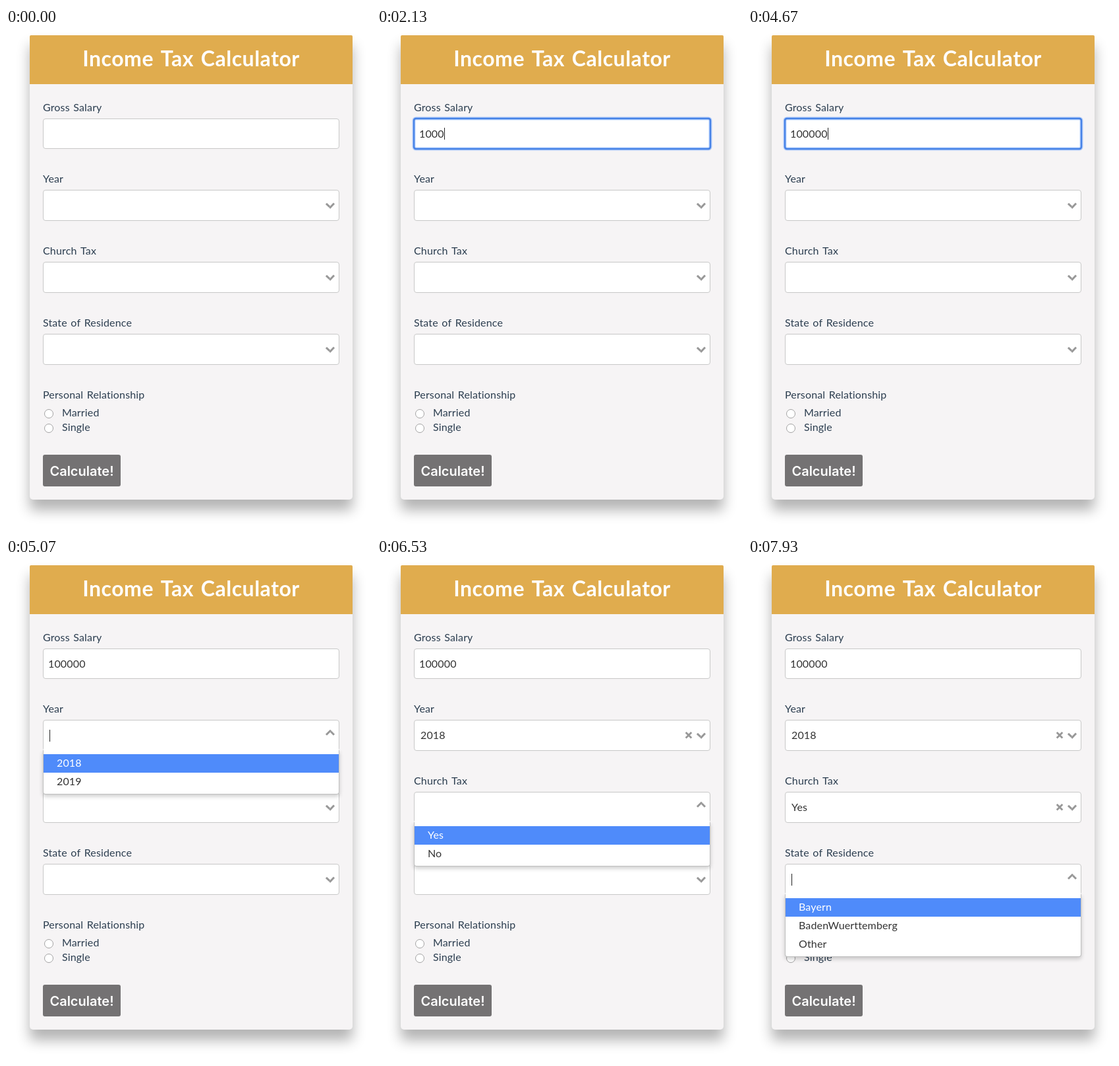
An HTML page with a canvas that plays this animation: 554x760 px, repeating every 8000 ms.

```html
<!DOCTYPE html>
<html lang="en">
<head>
<meta charset="utf-8">
<title>Income Tax Calculator</title>
<style>
  html, body { margin: 0; width: 100%; height: 100%; overflow: hidden; background: #fff; }
  canvas { display: block; width: 554px; height: 760px; }
</style>
</head>
<body>
<canvas id="stage"></canvas>
<script>
const W = 554, H = 760, LOOP = 8000, FADE = 150;
const LEFT = 56, WIDTH = 450;
const LABEL = '#2c3e50', VALUE = '#333', BORDER = '#c8c8c8', ICON = '#989898';

const canvas = document.getElementById('stage');
const ctx = canvas.getContext('2d');
const dpr = window.devicePixelRatio || 1;
canvas.width = W * dpr;
canvas.height = H * dpr;

// Salary input: focus, key presses and blur
const FOCUS = 670, BLUR = 4870;
const KEYS = [1270, 1600, 1800, 2030, 2530, 3670];
const SALARY = '100000';

const selects = [
  { label: 'Year', top: 245, options: ['2018', '2019'], open: 4870, pick: 5400, caretOff: 5370 },
  { label: 'Church Tax', top: 354, options: ['Yes', 'No'], open: 5800, pick: 7100, caretOff: 6530 },
  { label: 'State of Residence', top: 463, options: ['Bayern', 'BadenWuerttemberg', 'Other'],
    open: 7600, pick: Infinity, caretOff: Infinity }
];

const clamp = v => Math.min(1, Math.max(0, v));

function text(str, x, y, color, font = '16px Lato, sans-serif', spacing = 0.15, words = 1.3, align = 'left') {
  ctx.font = font;
  ctx.letterSpacing = spacing + 'px';
  ctx.wordSpacing = words + 'px';
  ctx.textAlign = align;
  ctx.fillStyle = color;
  ctx.fillText(str, x, y);
}

function box(x, y, w, h, radius, fill) {
  ctx.beginPath();
  ctx.roundRect(x, y, w, h, radius);
  ctx.fillStyle = fill;
  ctx.fill();
}

function outline(color, width) {
  ctx.strokeStyle = color;
  ctx.lineWidth = width;
  ctx.stroke();
}

function shadow(color, blur, dy) {
  ctx.shadowColor = color;
  ctx.shadowBlur = blur * dpr;
  ctx.shadowOffsetY = dy * dpr;
}

function field(top, height) {
  box(LEFT + 0.5, top + 0.5, WIDTH - 1, height - 1, 3.5, '#fff');
  outline(BORDER, 1);
}

function caret(x, top) {
  ctx.fillStyle = '#222';
  ctx.fillRect(Math.round(x), top, 1, 18);
}

function card() {
  ctx.save();
  shadow('rgba(0,0,0,0.3)', 20, 16);
  box(36, 11, 490, 703, [2, 2, 5, 5], '#f6f4f5');
  ctx.restore();
  box(36, 11, 490, 74, [2, 2, 0, 0], '#e0ac4e');
  text('Income Tax Calculator', 281, 58, '#fff', 'bold 32px Lato, sans-serif', 0.5, 2.6, 'center');
}

function salary(t) {
  text('Gross Salary', LEFT, 126, LABEL);
  field(137, 46);
  const typed = SALARY.slice(0, KEYS.filter(k => t >= k).length);
  text(typed, 64, 166, VALUE);
  if (t < FOCUS || t >= BLUR) return;

  ctx.beginPath();
  ctx.roundRect(LEFT, 137, WIDTH, 46, 3);
  outline('rgba(77,144,254,0.4)', 5);
  outline('#4682e6', 2.4);
  // The blink restarts with each key press
  const last = [FOCUS, ...KEYS].filter(k => t >= k).pop();
  if ((t - last) % 1000 < 500) caret(64 + ctx.measureText(typed).width, 151);
}

function chevron(top, turn) {
  ctx.save();
  ctx.translate(492, top + 21.7);
  ctx.rotate((133 + 182 * turn) * Math.PI / 180);
  ctx.fillStyle = ICON;
  ctx.fillRect(-5, -5, 10, 3);
  ctx.fillRect(2, -2, 3, 7);
  ctx.restore();
}

function cross(top) {
  const y = top + 23.3, r = 4.3;
  ctx.beginPath();
  ctx.moveTo(473 - r, y - r);
  ctx.lineTo(473 + r, y + r);
  ctx.moveTo(473 + r, y - r);
  ctx.lineTo(473 - r, y + r);
  outline(ICON, 2.8);
}

function select(s, t) {
  text(s.label, LEFT, s.top - 11, LABEL);
  field(s.top, 47);
  const turn = clamp((t - s.open) / FADE) ** 3 - clamp((t - s.pick) / FADE) ** 3;
  chevron(s.top, turn);
  if (t >= s.pick) {
    text(s.options[0], 66, s.top + 29, VALUE);
    cross(s.top);
  }
}

function menu(s, t) {
  const alpha = clamp((t - s.open) / FADE) - clamp((t - s.pick) / FADE);
  if (t >= s.open && t < s.pick && t < s.caretOff) caret(66, s.top + 15);
  if (alpha <= 0) return;

  const top = s.top + 46, height = 11 + 28 * s.options.length;
  const corners = [0, 0, 4, 4];
  ctx.save();
  ctx.globalAlpha = alpha;
  ctx.save();
  ctx.beginPath();
  ctx.rect(LEFT - 10, top, WIDTH + 20, height + 20);
  ctx.clip();
  shadow('rgba(0,0,0,0.2)', 6, 3);
  box(LEFT, top, WIDTH, height, corners, '#bfbfbf');
  ctx.restore();
  box(LEFT + 1, top - 4, WIDTH - 2, height + 3, [0, 0, 3, 3], '#fff');
  s.options.forEach((name, i) => {
    const y = s.top + 52 + 28 * i;
    if (i === 0) {
      ctx.fillStyle = '#4f8bfa';
      ctx.fillRect(LEFT + 1, y, WIDTH - 2, 28);
    }
    text(name, 77, y + 19, i === 0 ? '#fff' : VALUE);
  });
  ctx.restore();
}

function radio(name, y) {
  ctx.beginPath();
  ctx.arc(65, y, 6.5, 0, 2 * Math.PI);
  ctx.fillStyle = '#fff';
  ctx.fill();
  outline('#a3a3a3', 1);
  text(name, 85, y + 4, LABEL);
}

function draw(t) {
  ctx.setTransform(dpr, 0, 0, dpr, 0, 0);
  ctx.fillStyle = '#fff';
  ctx.fillRect(0, 0, W, H);
  card();
  salary(t);
  selects.forEach(s => select(s, t));
  text('Personal Relationship', LEFT, 561, LABEL);
  radio('Married', 584);
  radio('Single', 606);
  box(LEFT, 646, 118, 48, 3, '#747273');
  text('Calculate!', 115, 678, '#fff', '600 20px Inter, sans-serif', 0, 0, 'center');
  selects.forEach(s => menu(s, t));
}

function tick() {
  draw(performance.now() % LOOP);
  requestAnimationFrame(tick);
}
tick();
</script>
</body>
</html>
```
